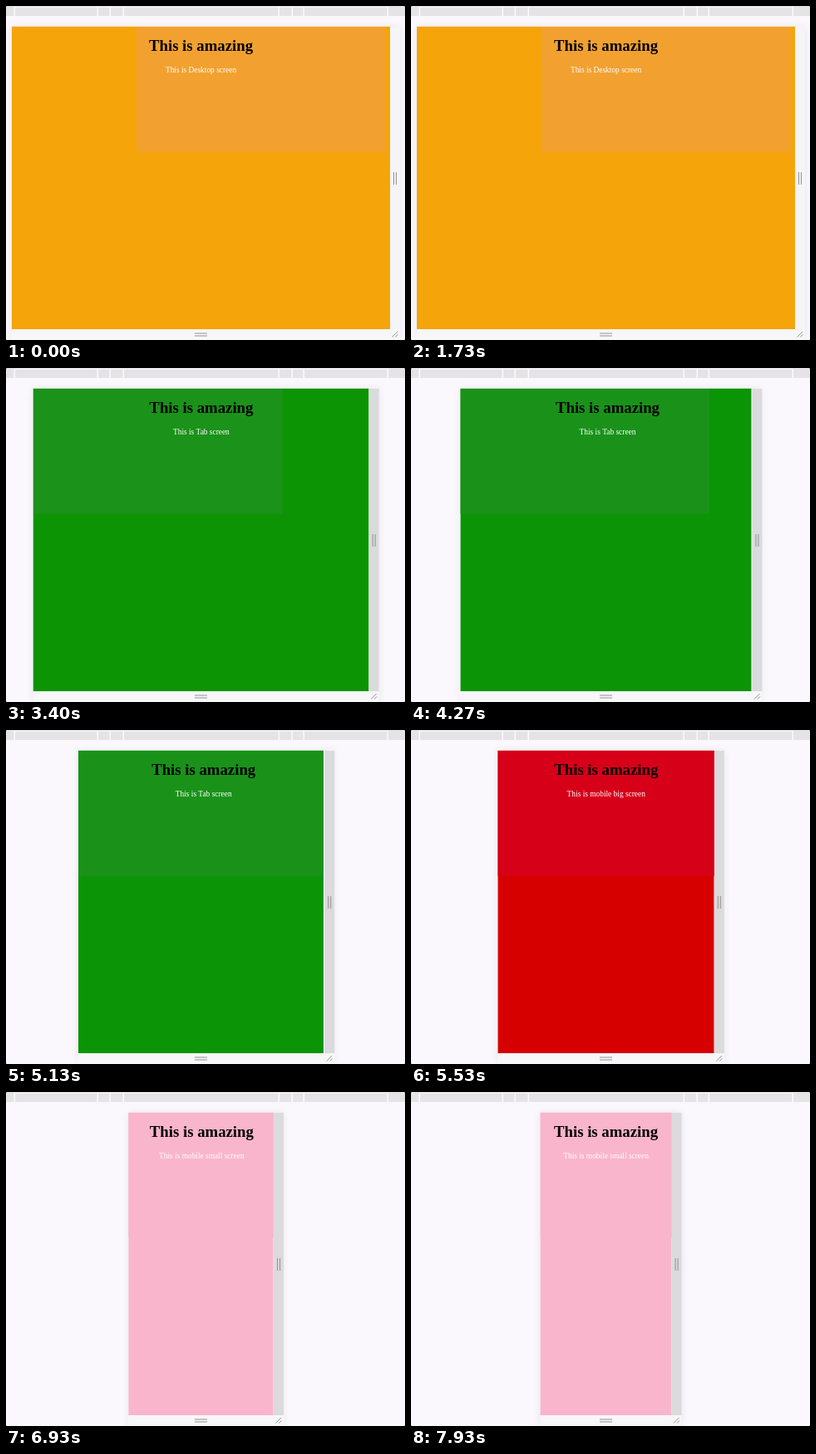
Recreate the animation shown at these times as an HTML page with a canvas. Size 480x402 px, loop 8000 ms.

```html
<!DOCTYPE html>
<html lang="en">
<head>
<meta charset="utf-8">
<title>Responsive resize</title>
<style>
  html, body { margin: 0; width: 100%; height: 100%; overflow: hidden; background: #faf8fc; }
  canvas { display: block; width: 480px; height: 402px; }
</style>
</head>
<body>
<canvas id="stage"></canvas>
<script>
const W = 480, H = 402, LOOP = 8000, STEP = 1000 / 15;
const CENTER = 234.5, TOP = 25, BOTTOM = 389;
const canvas = document.getElementById('stage');
const ctx = canvas.getContext('2d');
const dpr = window.devicePixelRatio || 1;
canvas.width = W * dpr;
canvas.height = H * dpr;

// Half the viewport width over time: [ms, px]
const widths = [
  [0, 227.5], [2870, 227.5], [3067, 226], [3133, 211], [3270, 203], [3400, 202],
  [3930, 188.5], [4800, 154], [5070, 151.5], [5133, 147.5], [5470, 130.5],
  [5670, 129.5], [6530, 93], [6600, 92.8], [7400, 79.5], [8000, 79]
];

// Breakpoints: page colour, box colour, box offset
const states = [
  { at: 0, label: 'This is Desktop screen', page: [245, 164, 10], box: [242, 161, 48], x: 150 },
  { at: 3130, label: 'This is Tab screen', page: [11, 148, 5], box: [26, 146, 26], x: 0 },
  { at: 5200, label: 'This is mobile big screen', page: [214, 0, 0], box: [215, 0, 25], x: 0 },
  { at: 6530, label: 'This is mobile small screen', page: [249, 181, 203], box: [249, 181, 204], x: 0 }
];
const FADE = 300, HOVER = 2470;

const mix = (a, b, k) => a + (b - a) * k;
const mixRgb = (a, b, k) => `rgb(${a.map((v, i) => Math.round(mix(v, b[i], k))).join(',')})`;

function halfWidth(t) {
  if (t <= 0) return widths[0][1];
  const i = widths.findIndex(p => p[0] >= t);
  if (i < 0) return widths[widths.length - 1][1];
  const [t0, w0] = widths[i - 1], [t1, w1] = widths[i];
  return mix(w0, w1, (t - t0) / (t1 - t0));
}

// CSS "ease" curve: cubic-bezier(.25, .1, .25, 1)
function ease(x) {
  if (x <= 0) return 0;
  if (x >= 1) return 1;
  const bez = (a, b, s) => 3 * a * s * (1 - s) ** 2 + 3 * b * s * s * (1 - s) + s ** 3;
  let lo = 0, hi = 1;
  for (let i = 0; i < 24; i++) {
    const mid = (lo + hi) / 2;
    if (bez(.25, .25, mid) < x) lo = mid; else hi = mid;
  }
  return bez(.1, 1, lo);
}

function rect(x, y, w, h, color) {
  ctx.fillStyle = color;
  ctx.fillRect(x, y, w, h);
}

function line(x0, y0, x1, y1, color = '#929092') {
  ctx.strokeStyle = color;
  ctx.beginPath();
  ctx.moveTo(x0, y0);
  ctx.lineTo(x1, y1);
  ctx.stroke();
}

function text(str, x, y, font, color) {
  ctx.font = font + ' "Liberation Serif", Times, serif';
  ctx.fillStyle = color;
  ctx.fillText(str, x, y);
}

function drawRuler() {
  rect(0, 0, W, 12, '#e5e3e6');
  rect(10, 1, 449, 1, '#f4f2f5');
  for (const x of [10, 110, 125, 141, 328, 344, 358, 459]) rect(x - .5, 1, 1.5, 11, '#fbfafc');
  for (const x of [0, W - 1]) {
    rect(x, 0, 1, 1, '#8f8e90');
    rect(x, H - 1, 1, 1, '#bbb9bc');
  }
}

function drawFrame(half, active) {
  const left = CENTER - half, right = CENTER + half, mid = right + 6;
  ctx.save();
  ctx.shadowColor = 'rgba(0,0,0,.07)';
  ctx.shadowBlur = 9 * dpr;
  rect(left, TOP, half * 2 + 12, H - TOP, '#f7f6f8');
  ctx.restore();
  rect(right, TOP, 12, BOTTOM - TOP, active ? '#dbdadc' : '#f5f4f7');
  ctx.lineWidth = 1;
  for (const d of [-1.5, 1.5]) {
    line(mid + d, 200, mid + d, 215);
    line(CENTER - 7.5, 395.5 + d, CENTER + 7.5, 395.5 + d);
  }
  line(mid - 3.5, 398.5, mid + 3, 392);
  line(mid + .5, 398.5, mid + 3.5, 395.5);
}

function drawPage(half, layoutHalf, t) {
  let n = states.length - 1;
  while (states[n].at > t + 6) n--;
  const now = states[n], prev = states[Math.max(0, n - 1)];
  const k = n ? ease((t - now.at) / FADE) : 1;
  const left = CENTER - half, mid = left + layoutHalf;

  ctx.save();
  ctx.beginPath();
  ctx.rect(left, TOP - .5, half * 2, BOTTOM - TOP + .5);
  ctx.clip();
  rect(left, TOP - .5, half * 2, BOTTOM - TOP + .5, mixRgb(prev.page, now.page, k));
  rect(left + mix(prev.x, now.x, k), TOP, 299.5, 150.5, mixRgb(prev.box, now.box, k));
  text('This is amazing', mid, 54.2, 'bold 18.75px', '#000');
  text(now.label, mid, 80, '9.4px', '#fff');
  ctx.restore();
}

function draw(ms) {
  const t = Math.floor(((ms % LOOP) + 8) / STEP) * STEP;
  ctx.setTransform(dpr, 0, 0, dpr, 0, 0);
  ctx.textAlign = 'center';
  rect(0, 0, W, H, '#faf8fc');
  drawRuler();
  // The frame and the page layout trail the dragged edge slightly
  drawFrame(halfWidth(t - 20), t >= HOVER);
  drawPage(halfWidth(t), halfWidth(t - 50), t);
}

const start = performance.now();
function tick() {
  draw(performance.now() - start);
  requestAnimationFrame(tick);
}
tick();
</script>
</body>
</html>
```
